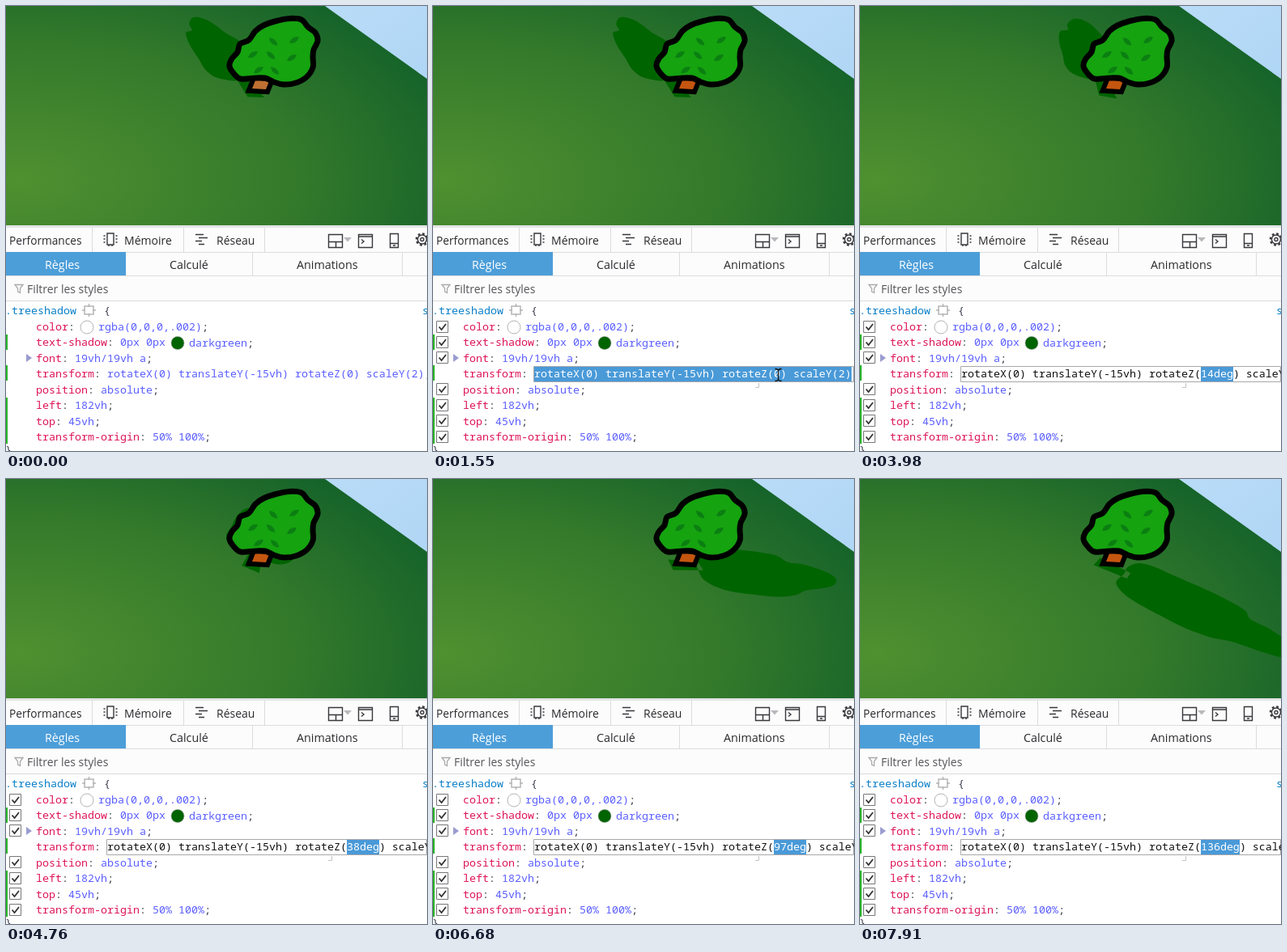
An HTML page for the animation above (7.99 s loop, 520 by 550 pixels).

```html
<!DOCTYPE html>
<html lang="fr">
<head>
<meta charset="utf-8">
<title>Ombre d'un arbre</title>
<style>
html, body { margin: 0; width: 100%; height: 100%; overflow: hidden; background: #fff; }
svg { display: block; width: 520px; height: 550px; }
text { white-space: pre; }
.ui { font: 14px "Open Sans", "Noto Sans", sans-serif; fill: #2a2a2e; }
.code { font: 13.333px "Noto Sans Mono", "DejaVu Sans Mono", monospace; fill: #393f4c; }
.name { fill: #dd1556; }
.val { fill: #5b5fff; }
.sel { fill: #0a7fc8; }
.icon { fill: none; stroke: #38383d; stroke-width: 1.4; }
.line { stroke: #dcdcde; }
</style>
</head>
<body>
<svg viewBox="0 0 520 550">
  <defs>
    <radialGradient id="grass" gradientUnits="userSpaceOnUse" r="700" gradientTransform="translate(15 215) scale(1 .5)" cx="0" cy="0">
      <stop offset="0" stop-color="#4f9030"/>
      <stop offset=".5" stop-color="#33792b"/>
      <stop offset=".8" stop-color="#17642a"/>
      <stop offset="1" stop-color="#0d5a28"/>
    </radialGradient>
    <linearGradient id="sky" x1="0" y1="0" x2="1" y2="1">
      <stop offset="0" stop-color="#b9dcf8"/>
      <stop offset="1" stop-color="#b0d6f5"/>
    </linearGradient>
  </defs>

  <path fill="url(#grass)" d="M0 0H520V271H0z"/>
  <path fill="url(#sky)" d="M394 0H520V90z"/>
  <path id="shadow" fill="#006400"/>
  <path id="trunk" d="M308 92L325 93L321 103L304 102z" stroke="#000" stroke-width="12" paint-order="stroke"/>
  <path id="crown" fill="#15a30f" stroke="#000" stroke-width="7"/>
  <g id="leaves" fill="#0b7f12"></g>

  <g id="overlay">
    <path fill="#80d4ff" fill-opacity=".7" d="M200 18H276L352 106H254z"/>
    <path fill="none" stroke="#0b8ad0" stroke-width="2" stroke-dasharray="5 3"
      d="M200 18H276L352 106H254zM276 18L520 120M200 18L520 156M352 106L520 185M254 106L520 232"/>
  </g>

  <path fill="#fcfcfc" d="M0 271H520V364H0z"/>
  <path fill="#fff" d="M0 364H520V550H0z"/>
  <path fill="#e3e4e6" d="M0 271H520V274H0z"/>
  <path class="line" d="M0 304.500H520M0 333.500H520M0 364.500H520M106.500 274V304M219.500 274V304M319.500 274V304M304.500 304V333M489.500 304V333"/>
  <path fill="#4c9ed9" d="M0 304H148V333H0z"/>
  <g class="ui">
    <text x="4" y="295" style="font-size:13.7px">Performances</text>
    <text x="146" y="295">Mémoire</text>
    <text x="260" y="295">Réseau</text>
    <g style="font-size:14.3px">
      <text x="48" y="325" fill="#fff">Règles</text>
      <text x="202" y="325">Calculé</text>
      <text x="359" y="325">Animations</text>
    </g>
    <text x="26" y="355" fill="#55555a">Filtrer les styles</text>
  </g>
  <g class="icon">
    <path d="M125 281H133V295H125zM122.500 284H120.500M122.500 288H120.500M122.500 292H120.500M135.500 284H137.500M135.500 288H137.500M135.500 292H137.500M127 295V297M131 295V297"/>
    <path d="M234 282.500H244M238 286.500H249M234 290.500H242M238 294.500H245"/>
    <path d="M398.500 282.500H415.500V298.500H398.500zM398.500 291.500H415.500M407.500 291.500V298.500"/>
    <path d="M435.500 282.500H452.500V298.500H435.500zM435.500 285H452.500M439 288.500L442 291L439 293.500"/>
    <path d="M474.500 281.500H484.500V298.500H474.500zM474.500 293.500H484.500M478 296H481"/>
    <circle cx="514" cy="288.500" r="5.500"/><circle cx="514" cy="288.500" r="2"/>
    <circle cx="514" cy="288.500" r="7" stroke-width="2.500" stroke-dasharray="2.750"/>
  </g>
  <path fill="#b8b8bc" d="M417 286H427L422 291.500z"/>
  <path fill="none" stroke="#aaa" stroke-width="1.300" d="M11 344.500H21L17.500 349V354.500L14.500 353V349z"/>

  <g class="code">
    <text x="-1" y="381" class="sel">.treeshadow</text>
    <text x="121" y="381">{</text>
    <text x="514" y="381" class="sel">s</text>
    <text x="-1" y="553">}</text>
    <g id="rules"></g>
  </g>
  <path fill="none" stroke="#b5b5b8" stroke-width="1.500" d="M97 371H108V381H97zM102.500 368V372M102.500 380V384M94 376H98M107 376H111"/>
  <circle cx="100" cy="397" r="8" fill="#fff" stroke="#b5b5b8"/>
  <circle cx="212" cy="416.500" r="8" fill="#006400" stroke="#9a9a9a" stroke-width=".6"/>
  <path fill="#9a9cd0" d="M25 430V440L32 435z"/>
  <path fill="#28b428" d="M0 406H2V425H0zM0 444H2V463H0zM0 484H2V541H0z"/>
  <g id="checks" fill="#fff"></g>
  <path id="dashes" stroke="#7a7ddc" stroke-dasharray="3 2" d="M125 463.500H518"/>

  <g id="editor" class="code">
    <path fill="#fff" stroke="#a8a8ac" d="M124.500 445.500H519.500V464.500H124.500z"/>
    <rect id="mark" y="446" height="18" fill="#4a9ad8"/>
    <text y="459" fill="#111"><tspan id="before" x="125">rotateX(0) translateY(-15vh) rotateZ(</tspan><tspan id="angle"></tspan><tspan id="after">) scaleY(2)</tspan></text>
  </g>
  <path id="speck" fill="none" stroke="#c4c4c8" d="M398 471.500H402.500V466"/>
  <path id="beam" fill="none" stroke="#111" stroke-width="1.300" d="M-4 -7.500Q0 -7.500 0 -5Q0 -7.500 4 -7.500M0 -6V6M-4 7.500Q0 7.500 0 5Q0 7.500 4 7.500"/>
</svg>
<script>
const LOOP = 7990, TYPE = 3110, REPEAT = 3570, STEP = 77.49;
const el = id => document.getElementById(id);
const show = (id, on) => el(id).style.display = on ? "" : "none";

// Closed Catmull-Rom curve through the points
function smooth(pts) {
  const n = pts.length, at = i => pts[(i + n) % n];
  const fmt = (x, y) => x.toFixed(2) + " " + y.toFixed(2);
  let d = "M" + fmt(...pts[0]);
  for (let i = 0; i < n; i++) {
    const [a, b, c, e] = [at(i - 1), at(i), at(i + 1), at(i + 2)];
    d += "C" + fmt(b[0] + (c[0] - a[0]) / 6, b[1] + (c[1] - a[1]) / 6) +
      " " + fmt(c[0] - (e[0] - b[0]) / 6, c[1] - (e[1] - b[1]) / 6) + " " + fmt(...c);
  }
  return d + "z";
}

const crown = [[300, 42], [308, 31], [318, 24], [332, 19], [350, 15.5], [365, 17], [373, 26],
  [382, 33], [385, 43], [380, 54], [379, 63], [379, 76], [371, 88], [358, 95], [343, 97],
  [331, 94], [320, 89], [308, 89], [290, 90], [281, 83], [276, 74], [279, 65], [286, 57], [289, 47]];
el("crown").setAttribute("d", smooth(crown));

el("leaves").innerHTML = [[330, 44], [356, 42], [305, 60], [327, 61], [353, 64], [312, 79], [332, 80]]
  .map(([x, y], i) => `<path d="M-7 0Q0 -6 7 0Q0 6 -7 0z" transform="translate(${x} ${y}) rotate(${i % 3 ? -32 : 42})"/>`).join("");

const rules = [["color", "rgba(0,0,0,.002)", 114], ["text-shadow", "0px 0px"], ["font", "19vh/19vh a"],
  ["transform", "rotateX(0) translateY(-15vh) rotateZ(0) scaleY(2)"], ["position", "absolute"],
  ["left", "182vh"], ["top", "45vh"], ["transform-origin", "50% 100%"]];
const rowY = i => 396.5 + i * 19.45;
el("rules").innerHTML = rules.map(([name, value, x], i) => {
  const y = Math.round(rowY(i) + 4.5), end = i == 1 ? "" : ";";
  return `<text x="37" y="${y}"><tspan class="name">${name}</tspan>: </text>` +
    `<text x="${x || 37 + 8 * (name.length + 2)}" y="${y}"><tspan class="val">${value}</tspan>${end}</text>`;
}).join("") + `<text x="226" y="421"><tspan class="val">darkgreen</tspan>;</text>`;

el("checks").innerHTML = rules.map((r, i) =>
  `<g id="check${i}" transform="translate(4.5 ${Math.round(rowY(i)) - 7.5})"><path stroke="#77777b" d="M0 0H14V14H0z"/>` +
  `<path fill="none" stroke="#333" stroke-width="1.800" d="M3 7L6 10.500L11.500 3.500"/></g>`).join("");

// Tree outline on the ground: across, along (1 = box height)
const crownShade = [[0, .13], [-.09, .125], [-.2, .17], [-.24, .27], [-.236, .4], [-.238, .55],
  [-.23, .664], [-.2, .79], [-.13, .83], [-.12, .92], [-.09, .99], [-.03, 1.06], [.03, 1.06],
  [.09, 1], [.125, .92], [.165, .78], [.22, .68], [.25, .56], [.25, .42], [.23, .23], [.146, .123]];
const trunkShade = [[-.055, -.055], [.065, -.06], [.04, .16], [-.04, .16]];

function drawShadow(deg) {
  const s = Math.sin(deg * Math.PI / 180), c = Math.cos(deg * Math.PI / 180);
  const project = ([u, v]) => {
    const x = u * c + v * s, y = v * c - u * s, w = 1 + .289 * y;
    return [(303 + 165 * x + 3.9 * y) / w, (106 - 82.8 * y) / w];
  };
  el("shadow").setAttribute("d", smooth(crownShade.map(project)) +
    "M" + trunkShade.map(p => project(p).map(n => n.toFixed(2)).join(" ")).join("L") + "z");
}

function angleAt(t) {
  if (t < TYPE) return 0;
  if (t < REPEAT) return 1;
  return Math.round(1.75 + 2.39 * Math.min(56, Math.floor((t - REPEAT) / STEP)));
}

function render(t) {
  const hover = t >= 460, edit = t >= 1550, deg = angleAt(t);
  drawShadow(deg);
  el("trunk").setAttribute("fill", hover ? "#c4560f" : "#bf7032");
  show("overlay", t >= 770 && t < 1470);
  show("checks", hover);
  show("check3", !edit);
  show("dashes", t >= 770 && !edit);
  show("speck", hover);
  show("editor", edit);

  show("beam", hover && t < TYPE);
  const k = Math.min(1, Math.max(0, (t - 460) / 780)), ease = k * (2 - k);
  el("beam").setAttribute("transform", `translate(${398 + 28.5 * ease} ${467 - 11 * ease})`);

  const label = deg ? deg + "deg" : "0", all = t < 2170, part = t >= 2790;
  el("angle").textContent = label;
  el("mark").setAttribute("x", all ? 125 : 421);
  el("mark").setAttribute("width", all ? 392 : part ? label.length * 8 : 0);
  el("before").style.fill = el("after").style.fill = all ? "#fff" : "";
  el("angle").style.fill = all || part ? "#fff" : "";
}

const start = performance.now();
function tick() {
  render((performance.now() - start) % LOOP);
  requestAnimationFrame(tick);
}
tick();
</script>
</body>
</html>
```
